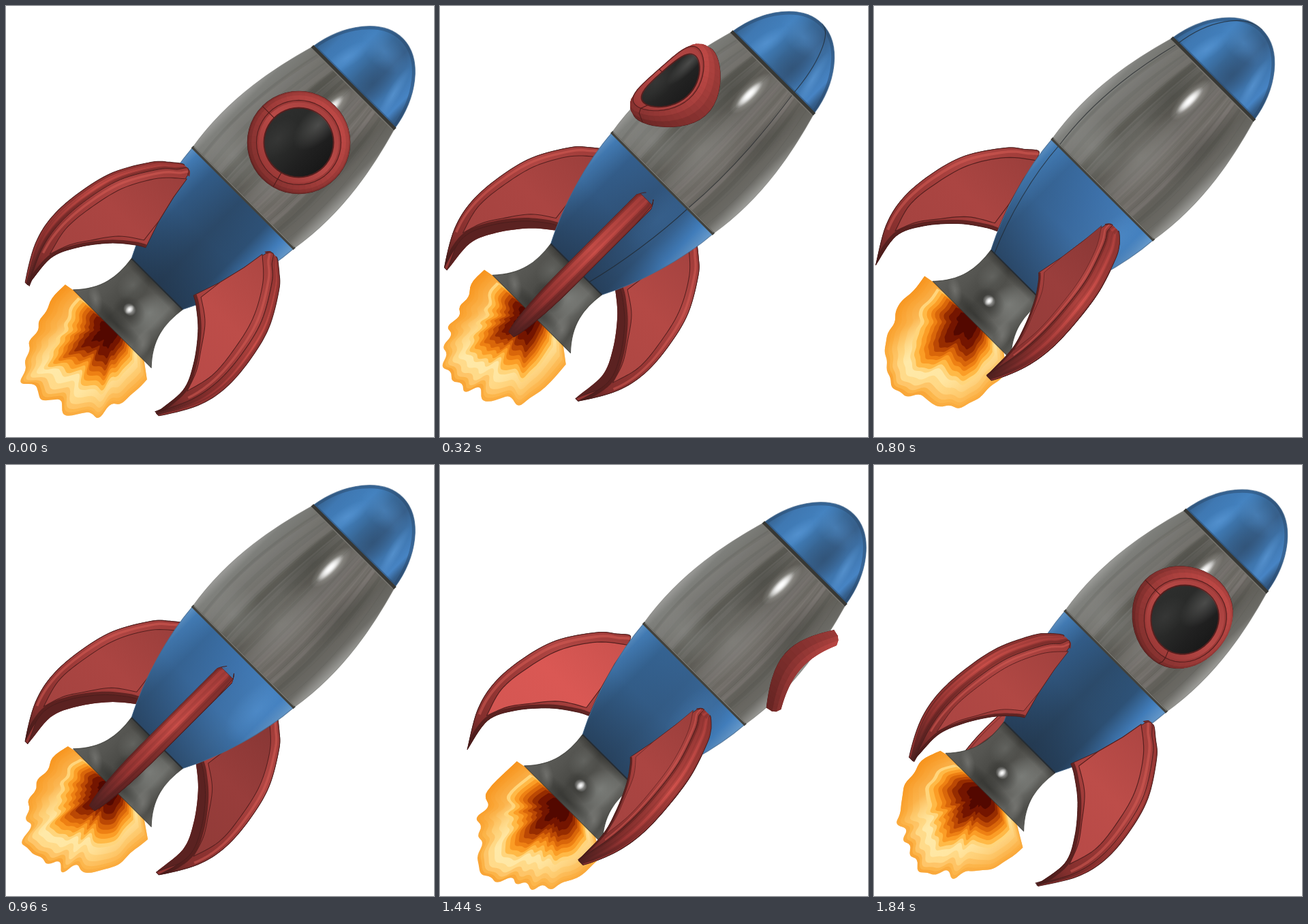
An HTML page with a canvas that plays this animation: 628 by 633 pixels, repeating every 1.92 s.

```html
<!DOCTYPE html>
<html lang="en">
<head>
<meta charset="utf-8">
<title>Rocket</title>
<style>
html, body { margin: 0; width: 100%; height: 100%; overflow: hidden; background: #fff; }
canvas { display: block; }
</style>
</head>
<body>
<canvas id="stage" width="628" height="633"></canvas>
<script>
const ctx = document.getElementById('stage').getContext('2d');
const STEPS = 24, STEP_MS = 80, TURN = Math.PI * 2;
const { sin, cos, sqrt, abs, min, max, PI } = Math;

// Left half of each hull section: start, two controls, end.
const NOSE = [-85, -276, -77, -330, -42, -378, 0, -378];
const CABIN = [-85, -276, -101, -220, -120, -138, -105, -47];
const TANK = [-105, -47, -101, 10, -80, 80, -53, 132];
const NOZZLE = [-53, 132, -48, 165, -52, 195, -81, 225];

function random(seed) {
  let s = seed * 7919 + 17;
  return () => {
    s = (s * 1664525 + 1013904223) % 4294967296;
    return s / 4294967296;
  };
}

const mix = (a, b, t) => `rgb(${a.map((v, i) => Math.round(v + (b[i] - v) * t))})`;

function ramp(x0, y0, x1, y1, ...stops) {
  const g = ctx.createLinearGradient(x0, y0, x1, y1);
  stops.forEach(([at, color]) => g.addColorStop(at, color));
  return g;
}

// Catmull-Rom samples through a few points.
function smooth(pts, n = 8) {
  const out = [];
  for (let i = 0; i < pts.length - 1; i++) {
    const a = pts[max(i - 1, 0)], b = pts[i], c = pts[i + 1];
    const d = pts[min(i + 2, pts.length - 1)];
    for (let j = 0; j < n; j++) {
      const t = j / n;
      out.push([0, 1].map(q => 0.5 * (2 * b[q] + (c[q] - a[q]) * t +
        (2 * a[q] - 5 * b[q] + 4 * c[q] - d[q]) * t * t +
        (3 * b[q] - a[q] - 3 * c[q] + d[q]) * t * t * t)));
    }
  }
  out.push(pts[pts.length - 1]);
  return out;
}

function trace(pts, close = true) {
  ctx.beginPath();
  pts.forEach(p => ctx.lineTo(p[0], p[1]));
  if (close) ctx.closePath();
}

function line(pts, color, width) {
  trace(pts, false);
  ctx.strokeStyle = color;
  ctx.lineWidth = width;
  ctx.stroke();
}

function paint(pts, fill, stroke, width = 1) {
  trace(pts);
  ctx.fillStyle = fill;
  ctx.fill();
  if (stroke) {
    ctx.strokeStyle = stroke;
    ctx.lineWidth = width;
    ctx.stroke();
  }
}

function section([x0, y0, x1, y1, x2, y2, x3, y3]) {
  ctx.beginPath();
  ctx.moveTo(x0, y0);
  ctx.bezierCurveTo(x1, y1, x2, y2, x3, y3);
  ctx.lineTo(-x3, y3);
  ctx.bezierCurveTo(-x2, y2, -x1, y1, -x0, y0);
  ctx.closePath();
}

// Lengthwise line on the hull; s runs from -1 (left edge) to 1 (right edge).
function meridian(s, parts, color, width) {
  ctx.strokeStyle = color;
  ctx.lineWidth = width;
  for (const [x0, y0, x1, y1, x2, y2, x3, y3] of parts) {
    ctx.beginPath();
    ctx.moveTo(-x0 * s, y0);
    ctx.bezierCurveTo(-x1 * s, y1, -x2 * s, y2, -x3 * s, y3);
    ctx.stroke();
  }
}

function glow(x, y, rx, ry, color, tilt = 0) {
  ctx.save();
  ctx.translate(x, y);
  ctx.rotate(tilt);
  ctx.scale(rx, ry);
  const g = ctx.createRadialGradient(0, 0, 0, 0, 0, 1);
  g.addColorStop(0, `rgba(${color})`);
  g.addColorStop(1, `rgba(${color.replace(/[^,]+$/, '0')})`);
  ctx.fillStyle = g;
  ctx.fillRect(-1, -1, 2, 2);
  ctx.restore();
}

function inside(part, draw) {
  ctx.save();
  section(part);
  ctx.clip();
  draw();
  ctx.restore();
}

function seam(x, y, width, color) {
  ctx.fillStyle = color;
  ctx.fillRect(-x, y - width / 2, x * 2, width);
}

// Fin side view as (distance from axis, height).
const finOuter = smooth([[101, -13], [107, -20], [122, -8], [144, 11], [178, 62], [194, 117], [198, 170], [187, 216], [157, 267]]);
const finInner = smooth([[157, 267], [166, 216], [148, 177], [115, 139], [83, 115], [66, 106]]);
const finRoot = [[82, 65], [93, 25]];
const panelOuter = smooth([[99, -8], [134, 21], [165, 69], [180, 124], [184, 170], [172, 212]]);
const panelInner = smooth([[172, 212], [160, 182], [141, 156], [112, 122], [77, 100]]);

// Half thickness, rounded off at the root and the tip.
function finThick(y) {
  const tip = max(0, (y - 150) / 125);
  return 15 * sqrt(min(1, (y + 24) / 16) * (1 - tip * tip));
}

function drawFin(a, turn) {
  const sa = sin(a), ca = cos(a);
  const put = (pts, t, dr = 0) => pts.map(([r, y]) => [(r + dr) * sa + t * finThick(y) * ca, y]);
  const band = (pts, t0, t1, bulge) =>
    [...put(pts, t0, -bulge * t0 * t0), ...put(pts, t1, -bulge * t1 * t1).reverse()];
  const near = sa > 0 ? -1 : 1;
  const face = [...finOuter, ...finInner, ...finRoot];
  paint(put(face, -near), '#6d2725');
  paint(band(finInner, -1, 1, 0), '#5b2221');
  paint(band(finOuter, -1, 1, 0), '#8f3331', '#4a1f1e', 1);

  // Rounded outer rim, built from narrow strips.
  if (ca > 0.01) {
    const n = 12;
    for (let i = 0; i < n; i++) {
      const t0 = i / n * 2 - 1, t1 = min(1, (i + 1.3) / n * 2 - 1);
      const tm = (t0 + t1) / 2;
      const lit = 0.42 + 0.4 * cos(tm * 2.2 + near * 0.3) + 0.15 * sin(tm * 9);
      paint(band(finOuter, t0, t1, 4), ramp(0, -20, 0, 267,
        [0, mix([100, 35, 33], [175, 64, 61], lit)],
        [0.4, mix([105, 36, 34], [215, 84, 78], lit)],
        [0.75, mix([80, 29, 28], [160, 55, 53], lit)],
        [1, '#4c1f1e']));
    }
  }

  const side = put(face, near);
  paint(side, ramp(0, -22, 0, 267,
    [0, '#9c3a37'], [0.3, '#b04643'], [0.6, '#9a3836'], [0.85, '#832f2d'], [1, '#4c1f1e']), '#4a1f1e', 0.9);
  ctx.save();
  trace(side);
  ctx.clip();
  const tube = finOuter.slice(6, -8).map(([r, y]) => [r - 6, y + 2]);
  line(put(tube, near), 'rgba(218,94,86,.5)', 4 * abs(sa));
  line(put(finInner, near), 'rgba(70,26,25,.7)', 11 * abs(sa));
  ctx.restore();

  const lit = sa < 0 ? 0.35 + 0.5 * max(0, -sin(turn)) * sa * sa : 0.35 + 0.2 * cos(turn);
  const tone = d => mix([132, 53, 51], [226, 92, 87], lit + d);
  paint(put([...panelOuter, ...panelInner, ...finRoot], near),
    ramp(0, 0, 0, 200, [0, tone(-0.1)], [0.5, tone(0.06)], [1, tone(0)]), '#56201f', 1.2 * abs(sa));
}

// A circle of radius p wrapped on the tapering hull at distance R, turned by a.
function wrapped(p, R, a, n = 48) {
  return Array.from({ length: n }, (_, i) => {
    const q = i / n * TURN, s = p * sin(q), y = -p * cos(q);
    const d = sqrt(R * R - s * s) + y * 0.07;
    return [s * cos(a) + d * sin(a), y - 162, d * cos(a) - s * sin(a)];
  });
}

function drawPorthole(a) {
  if (cos(a) < -0.6) return;
  const rings = [[75, 105], [73, 114], [69, 119], [62, 122]].map(([p, R]) => wrapped(p, R, a));
  const base = rings[0], lip = rings[3];
  const bevel = wrapped(59, 121, a), hole = wrapped(51, 116, a);
  const n = base.length;
  paint(base, '#8f3432', '#451a19', 1.6);
  const quads = [];
  rings.slice(1).forEach((top, j) => top.forEach((p, i) => {
    const next = (i + 1) % n;
    quads.push({ z: p[2], i, j, pts: [rings[j][i], rings[j][next], top[next], p] });
  }));
  quads.sort((u, v) => u.z - v.z).forEach(({ i, j, pts }) => {
    const lit = 0.25 + 0.35 * cos(i / n * TURN - 0.2) + 0.2 * j;
    const color = mix([112, 41, 39], [188, 72, 69], lit);
    paint(pts, color, color, 0.8);
  });
  if (cos(a) < 0.01) return;

  paint(lip, '#9c3937', '#5a2120', 1.2);
  paint(bevel, ramp(0, -225, 0, -100, [0, '#a8403e'], [0.5, '#b84a47'], [1, '#9c3937']));
  for (const i of [22, 36]) line([base[i], rings[2][i], lip[i], hole[i]], '#4f1d1c', 1.1);
  const x = 115 * sin(a);
  paint(hole, ramp(x - 50, 0, x + 50, 0, [0, '#2d2e2d'], [0.45, '#282928'], [0.7, '#202020'], [1, '#181818']), '#541f1e', 2);
  ctx.save();
  trace(hole);
  ctx.clip();
  glow(x + 2, -200, 24 * cos(a), 46, '112,112,110,.5');
  glow(x - 25 * cos(a), -145, 22, 38, '75,75,74,.35');
  ctx.restore();
}

const FIRE = [
  [1, '#f9a435'], [0.96, '#fcb347'], [0.92, '#fec569'], [0.86, '#ffdb8b'], [0.78, '#ffe9a8'],
  [0.69, '#ffd57c'], [0.64, '#ffb946'], [0.58, '#fb9d26'], [0.52, '#ee8013'], [0.47, '#d9660a'],
  [0.41, '#bb4804'], [0.35, '#962c00'], [0.28, '#741500'], [0.18, '#530800']
];

function drawFlame(k) {
  const rnd = random(k + 3), n = 24;
  const spikes = Array.from({ length: n + 1 }, (_, i) => (i % 2 ? 0.2 : -0.2) * rnd() + (rnd() - 0.5) * 0.4);
  const drift = rnd() * TURN;
  const shape = s => {
    const inner = 1 - s, rough = 0.3 + inner * 0.35;
    ctx.beginPath();
    ctx.moveTo(-62 * s, 222);
    let px, py;
    for (let i = 0; i <= n; i++) {
      const q = i / n * PI;
      const wave = sin(q * 5 + drift) * (0.03 + inner * 0.2);
      const m = s * (1 + rough * spikes[i] + wave);
      const x = -93 * cos(q) * m, y = 228 + 143 * Math.pow(sin(q), 0.8) * m;
      if (i) ctx.quadraticCurveTo(px, py, (px + x) / 2, (py + y) / 2);
      else ctx.lineTo(x, y);
      px = x;
      py = y;
    }
    ctx.lineTo(62 * s, 222);
    ctx.closePath();
  };
  FIRE.forEach(([s, color], i) => {
    shape(s);
    ctx.fillStyle = color;
    ctx.fill();
    if (i === 4) {
      ctx.save();
      shape(1);
      ctx.clip();
      ctx.fillStyle = ramp(-95, 250, 95, 270, [0, 'rgba(247,148,30,.95)'], [0.2, 'rgba(250,165,52,.75)'],
        [0.42, 'rgba(255,210,110,0)'], [0.7, 'rgba(255,200,100,.1)'], [1, 'rgba(250,170,60,.8)']);
      ctx.fillRect(-140, 210, 280, 230);
      ctx.restore();
    }
  });
}

function drawNozzle() {
  inside(NOZZLE, () => {
    ctx.fillStyle = ramp(-75, 0, 75, 0, [0, '#5d5d59'], [0.2, '#555551'], [0.4, '#484844'],
      [0.55, '#585854'], [0.75, '#6c6d69'], [0.9, '#4c4c48'], [1, '#5c5c58']);
    ctx.fillRect(-90, 125, 180, 110);
    glow(22, 170, 26, 32, '138,141,137,.6');
    glow(-24, 158, 20, 26, '125,127,123,.45');
    glow(0, 190, 26, 22, '40,40,37,.6');
    glow(0, 216, 60, 14, '36,36,33,.55');
    glow(-48, 212, 22, 10, '130,130,126,.6', 0.6);
    glow(48, 210, 12, 24, '130,130,126,.6', -0.5);
    ctx.fillStyle = ramp(0, 130, 0, 145, [0, 'rgba(30,30,28,.5)'], [1, 'rgba(30,30,28,0)']);
    ctx.fillRect(-60, 130, 120, 15);
    glow(-2, 187, 10, 9, '255,255,255,.8');
    glow(-2, 187, 5, 8, '255,255,255,1');
  });
  section(NOZZLE);
  ctx.strokeStyle = 'rgba(55,55,51,.8)';
  ctx.lineWidth = 1;
  ctx.stroke();
}

function drawTank(turn) {
  const back = (1 - cos(turn)) / 2;
  const mid = mix([44, 75, 108], [62, 116, 174], back);
  ctx.fillStyle = ramp(-105, 0, 105, 0, [0, '#5f93c6'], [0.06, '#427bb4'], [0.22, mix([50, 92, 136], [56, 105, 156], back)],
    [0.5, mid], [0.75, mix([46, 82, 120], [68, 126, 186], back)], [0.9, '#427fbe'], [1, '#689bcc']);
  ctx.fillRect(-110, -50, 220, 190);
  ctx.fillStyle = ramp(0, -47, 0, 132, [0, 'rgba(30,45,62,0)'], [0.45, 'rgba(30,45,62,.12)'], [1, 'rgba(30,45,62,.6)']);
  ctx.fillRect(-110, -50, 220, 190);
  glow(45 - 25 * cos(turn), -5, 30, 60, `95,160,225,${0.4 * back}`);
}

function drawCabin() {
  ctx.fillStyle = ramp(-110, 0, 110, 0, [0, '#9a9a97'], [0.06, '#7e7f7b'], [0.2, '#70706b'], [0.33, '#62625c'],
    [0.45, '#5a5953'], [0.56, '#6c6a65'], [0.68, '#74706b'], [0.8, '#5f5e58'], [0.92, '#6c6b66'], [1, '#9c9c98']);
  ctx.fillRect(-115, -280, 230, 235);
  const rnd = random(5);
  for (let i = 0; i < 26; i++) {
    const dark = rnd() < 0.5;
    meridian(rnd() * 1.9 - 0.95, [CABIN], dark ? 'rgba(58,57,52,.12)' : 'rgba(165,160,154,.1)', 5 + rnd() * 10);
  }
  glow(5, -120, 45, 75, '158,158,153,.35');
  glow(-55, -80, 50, 45, '145,147,143,.4');
  glow(-25, -215, 25, 65, '58,58,52,.4');
  glow(60, -190, 22, 75, '62,61,56,.35');
  glow(-2, -231, 14, 40, '235,235,230,.5');
  glow(-2, -229, 8, 28, '255,255,255,1');
  glow(-2, -229, 6, 24, '255,255,255,1');
}

function drawNose() {
  ctx.fillStyle = ramp(-85, 0, 85, 0, [0, '#35608c'], [0.12, '#3f78b2'], [0.3, '#4280bd'], [0.45, '#386796'],
    [0.6, '#375f8a'], [0.75, '#3f76ae'], [0.88, '#4784c4'], [0.94, '#355f8c'], [1, '#2d4e73']);
  ctx.fillRect(-90, -385, 180, 115);
  glow(-6, -345, 40, 24, '88,150,212,.45');
  glow(15, -300, 26, 42, '46,78,112,.6');
  glow(-38, -300, 14, 40, '98,160,222,.5', 0.2);
  glow(48, -310, 9, 46, '98,160,222,.55', -0.25);
  section(NOSE);
  ctx.strokeStyle = 'rgba(42,74,110,.5)';
  ctx.lineWidth = 9;
  ctx.stroke();
}

function drawHull(turn) {
  drawNozzle();
  inside(TANK, () => drawTank(turn));
  inside(CABIN, drawCabin);
  inside(NOSE, drawNose);

  // Weld line running the length of the hull.
  const weld = PI / 2 - turn;
  if (cos(weld) > 0.01) meridian(sin(weld), [NOSE, CABIN, TANK], 'rgba(32,36,40,.7)', 1.1);

  for (const s of [-1, 1]) {
    meridian(s, [NOSE, TANK], 'rgba(70,104,140,.7)', 1.1);
    meridian(s, [CABIN], 'rgba(130,130,126,.7)', 1.1);
  }
  seam(86, -276, 5, '#383834');
  seam(84, -272.8, 1.4, '#77756f');
  seam(106, -47, 4.5, '#42423d');
  seam(104, -48.5, 1.2, '#7d7c76');
  seam(53, 132, 2, '#252c33');
}

function draw(k) {
  const turn = TURN * k / STEPS, bob = -25 * sin(turn), c = Math.SQRT1_2;
  ctx.setTransform(1, 0, 0, 1, 0, 0);
  ctx.fillStyle = '#fff';
  ctx.fillRect(0, 0, 628, 633);
  ctx.setTransform(c, c, -c, c, 315 + bob, 315 + bob);
  ctx.lineJoin = 'round';

  const fins = [-PI / 3, PI / 3, PI].map(a => a - turn).sort((a, b) => cos(a) - cos(b));
  const behind = a => cos(a) < 0.05;
  const portBehind = cos(turn) < -0.01;
  fins.filter(behind).forEach(a => drawFin(a, turn));
  drawFlame(k);
  if (portBehind) drawPorthole(-turn);
  drawHull(turn);
  if (!portBehind) drawPorthole(-turn);
  fins.filter(a => !behind(a)).forEach(a => drawFin(a, turn));
}

const start = performance.now();
let shown = -1;
function tick() {
  const k = Math.floor((performance.now() - start) / STEP_MS) % STEPS;
  if (k !== shown) draw(shown = k);
  requestAnimationFrame(tick);
}
tick();
</script>
</body>
</html>
```
